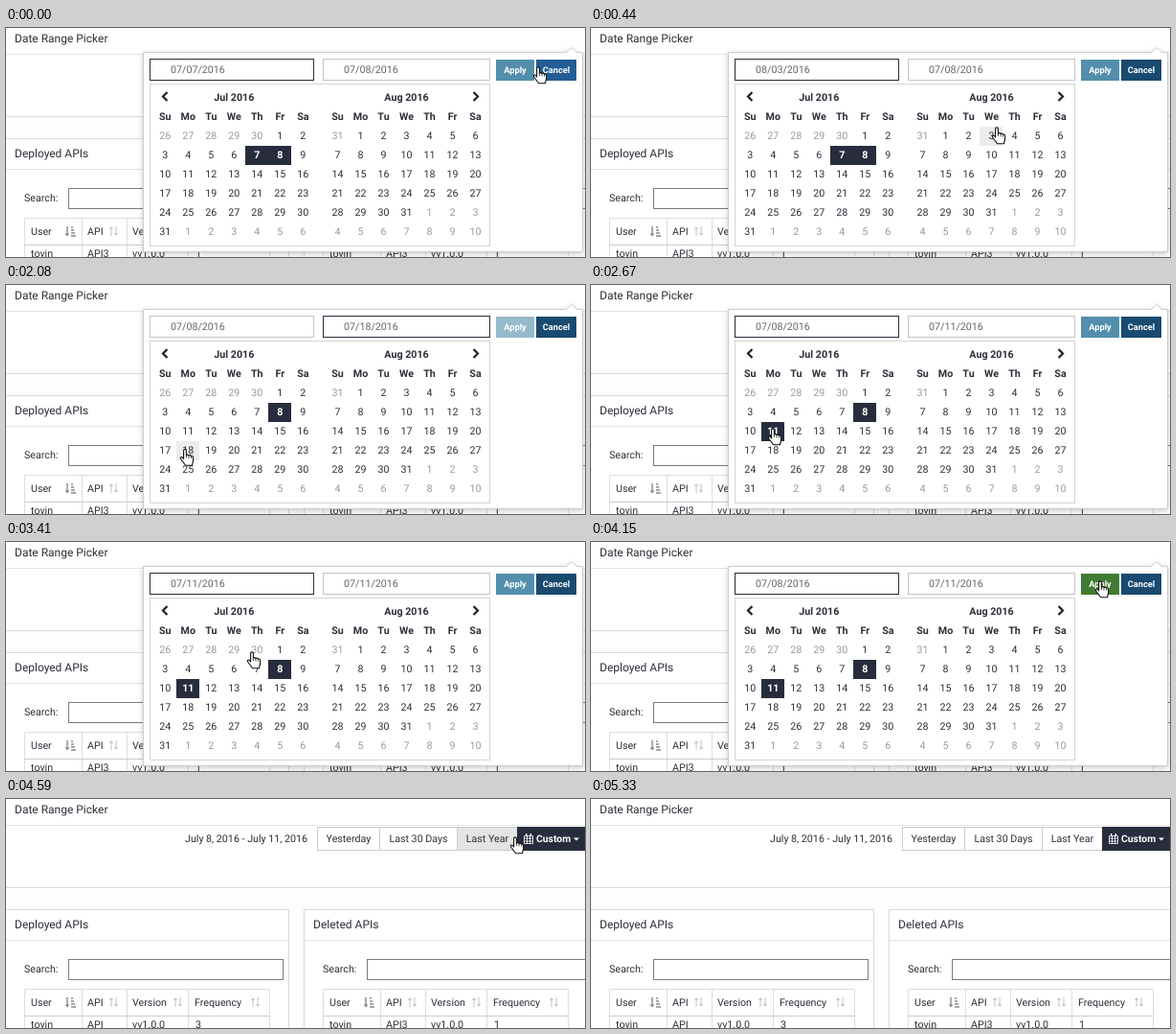
An HTML page for the animation above (5780 ms loop, 605 by 239 pixels).

```html
<!DOCTYPE html>
<html lang="en">
<head>
<meta charset="utf-8">
<title>Date range picker</title>
<style>
  html, body { margin: 0; width: 100%; height: 100%; overflow: hidden; background: #fff; }
  svg { display: block; font: 10.7px Roboto, sans-serif; text-rendering: geometricPrecision; }
</style>
</head>
<body>
<svg id="stage" width="605" height="239" viewBox="0 0 605 239"></svg>
<script>
const LOOP = 5780, INK = '#2b2f38', NAVY = '#282d3d';
const PICK_END = 1630, PICKED = 2670, CLOSED = 4290, UPDATED = 4590;

// time, pointer x, pointer y, day under the pointer
const steps = [
  [0, 556, 41], [150, 520, 68], [300, 424, 104, '08/03'], [450, 317, 126, '07/09'],
  [600, 232, 134, '07/06'], [740, 191, 142, '07/04'], [890, 216, 138, '07/05'],
  [1040, 256, 136, '07/07'], [1180, 285, 134, '07/08'], [PICK_END, 285, 134, '07/08'],
  [1930, 237, 160, '07/13'], [2080, 187, 171.5, '07/18'], [2230, 168, 174, '07/17'],
  [2370, 190, 150, '07/11'], [PICKED, 190, 150], [2820, 190, 150, '07/11'],
  [3410, 257, 115, '07/11'], [3560, 330, 102], [3710, 415, 80], [3850, 485, 62],
  [4000, 524, 48], [4150, 532, 41], [CLOSED, 532, 41], [4440, 532, 40], [UPDATED, 532, 40],
  [5030, 541, 76], [5180, 548, 218], [5330, 548, 300]
];

const text = (x, y, s, attrs = '', fill = INK) => `<text x="${x}" y="${y}" fill="${fill}" ${attrs}>${s}</text>`;
const rect = (x, y, w, h, fill, stroke = 'none') =>
  `<rect x="${x}" y="${y}" width="${w}" height="${h}" fill="${fill}" stroke="${stroke}"/>`;
const path = (d, stroke, width = 1, fill = 'none') =>
  `<path d="${d}" stroke="${stroke}" stroke-width="${width}" fill="${fill}"/>`;
const BOLD = 'font-weight="700"', MID = 'text-anchor="middle"', BIG = 'font-size="12"';

function sortIcon(x, active) {
  return active
    ? path(`M${x + 2} 207v9`, '#888', 1.4) + path(`M${x - .5} 214.5h5l-2.5 3z`, 'none', 0, '#888') +
      path(`M${x + 6} 208h2M${x + 6} 211h3M${x + 6} 214h4M${x + 6} 217h5`, '#888', 1.4)
    : path(`M${x + 2} 209v8M${x + 7} 207v8`, '#ccc', 1.2) +
      path(`M${x - .5} 210h5l-2.5-3zM${x + 4.5} 214h5l-2.5 3z`, 'none', 0, '#ccc');
}

function panel(x, title, api, count, inputWidth) {
  const heads = [['User', 26, 62], ['API', 85, 108], ['Version', 132, 175], ['Frequency', 197, 256]];
  const row = ['tovin', api, 'vv1.0.0', count];
  return `<g transform="translate(${x})">` +
    rect(-.5, 115.5, 296, 140, '#fff', '#d9d9d9') + path('M0 147.5H295', '#e4e4e4') +
    text(9, 135, title, BIG) + text(19, 181, 'Search:') +
    rect(65.5, 167.5, inputWidth, 21, '#fff', '#777b82') +
    path('M19.5 240V198.5H275.5V240M79.5 198V240M126.5 198V240M190.5 198V240', '#ddd') +
    path('M19 226.5H276', '#ccc') +
    heads.map(([label, tx, ix], i) =>
      text(tx, 216, label) + sortIcon(ix, !i) + text(tx + (i == 3 ? 1 : 0), 239, row[i])).join('') + '</g>';
}

function toolbar(hover) {
  const buttons = [['Yesterday', 325, 65], ['Last 30 Days', 390, 81], ['Last Year', 471, 63]];
  return text(187, 45, 'July 8, 2016 - July 11, 2016') +
    buttons.map(([label, x, w], i) =>
      rect(x + .5, 29.5, w, 24, hover && i == 2 ? '#e4e4e4' : '#fff', '#ccc') +
      text(x + w / 2 + .5, 45, label, MID)).join('') +
    rect(534, 29, 71, 25, NAVY) +
    path('M541.5 38.5h9v8h-9zM541 41h10M544.5 38v9M547.5 38v9M541 44h10', '#fff', .8) +
    path('M543.7 36v3M548.3 36v3', '#fff', 1.4) +
    text(554, 45, 'Custom', BOLD + ' font-size="10.4"', '#fff') +
    path('M593 40.5h6l-3 3z', 'none', 0, '#fff');
}

function calendar(x, title, month, lead, prevLength, length, selected, hover) {
  let out = text(x + 72, 76, title, MID + ' ' + BOLD);
  ['Su', 'Mo', 'Tu', 'We', 'Th', 'Fr', 'Sa'].forEach((d, i) => out += text(x + i * 24, 96, d, MID + ' ' + BOLD));
  for (let i = 0; i < 42; i++) {
    const day = i - lead + 1, off = day < 1 || day > length;
    const cx = x + i % 7 * 24, cy = 112 + 20 * (i / 7 | 0);
    const on = !off && selected.includes(day);
    const hovered = !off && hover == month + '/' + String(day).padStart(2, '0');
    if (on || hovered) out += rect(Math.floor(cx) - 12, cy - 9, 24, 20, on ? NAVY : '#ececec');
    out += text(cx, cy + 4, day < 1 ? day + prevLength : off ? day - length : day,
      MID + (on ? ' ' + BOLD : ''), on ? '#fff' : off ? '#999' : INK);
  }
  return out;
}

function popup(t, x, y, hover) {
  const choosingEnd = t >= PICK_END && t < PICKED;
  const selected = t < PICK_END ? [7, 8] : choosingEnd ? [8] : [8, 11];
  let start = t < PICK_END ? '07/07' : '07/08', end = t < PICKED ? '07/08' : '07/11';
  if (hover) choosingEnd ? end = hover : start = hover;
  const over = (left, width) => x >= left && x < left + width && y >= 33 && y < 55;
  const field = (left, w, value, active) =>
    rect(left + .5, 32.5, w, 22, '#fff', active ? NAVY : '#c4c4c4') +
    text(left + 22, 47, value + '/2016', '', '#666');
  const button = (left, w, label, fill) => rect(left, 33, w, 22, fill) +
    text(left + w / 2, 46.5, label, `${MID} ${BOLD} font-size="9.2"`, '#fff');
  return `<g style="filter:drop-shadow(0 2px 3px #0003)">` +
    path('M143.5 25.5H585.5L591 20.5L596.5 25.5H602.5V233.5H143.5Z', '#ccc', 1, '#fff') + '</g>' +
    field(150, 171, start, !choosingEnd) + field(331, 174, end, choosingEnd) +
    button(512, 40, 'Apply', choosingEnd ? '#94bacb' : over(512, 40) ? '#417b32' : '#538fac') +
    button(554, 42, 'Cancel', over(554, 42) ? '#225d93' : '#194a70') +
    rect(150.5, 58.5, 355, 169, '#fff', '#d4d4d4') +
    path('M168.5 67l-4.5 4.5 4.5 4.5M488.5 67l4.5 4.5-4.5 4.5', '#222', 2.2) +
    calendar(166.3, 'Jul 2016', '07', 5, 30, 31, selected, hover) +
    calendar(346.5, 'Aug 2016', '08', 1, 31, 31, [], hover);
}

const hand = (x, y) => `<g transform="translate(${x} ${y})" stroke-linejoin="round">` +
  path('M-1.4 10V1.3a1.4 1.4 0 0 1 2.8 0V6q1.6-.9 2.6.4 1.6-.7 2.5.6 2.1-.3 2.1 1.6V12L7.4 16.8H.6L-4.2 10.2q-1-1.8.3-2.2 1.2-.2 2.5 2z', '#111', 1.1, '#fff') +
  path('M1.4 6v3M4 6.8v2.6M6.5 7.4v2.2', '#111', .8) + '</g>';

function scene([t, x, y, hover]) {
  const updated = t >= UPDATED;
  return rect(0, 0, 605, 239, '#fdfdfd') + rect(-1, -1, 607, 93.5, '#fff', '#d9d9d9') +
    path('M0 27.5H605', '#e4e4e4') + text(9, 15, 'Date Range Picker', BIG) +
    panel(0, 'Deployed APIs', updated ? 'API' : 'API3', updated ? 3 : 1, 224) +
    panel(312, 'Deleted APIs', 'API3', 1, 230) +
    (t < CLOSED ? popup(t, x, y, hover) : toolbar(t > CLOSED && t <= UPDATED)) + hand(x, y);
}

const stage = document.getElementById('stage');
let shown;
function draw() {
  const t = performance.now() % LOOP;
  const step = steps.findLast(s => s[0] <= t);
  if (step !== shown) stage.innerHTML = scene(shown = step);
  requestAnimationFrame(draw);
}
draw();
</script>
</body>
</html>
```
